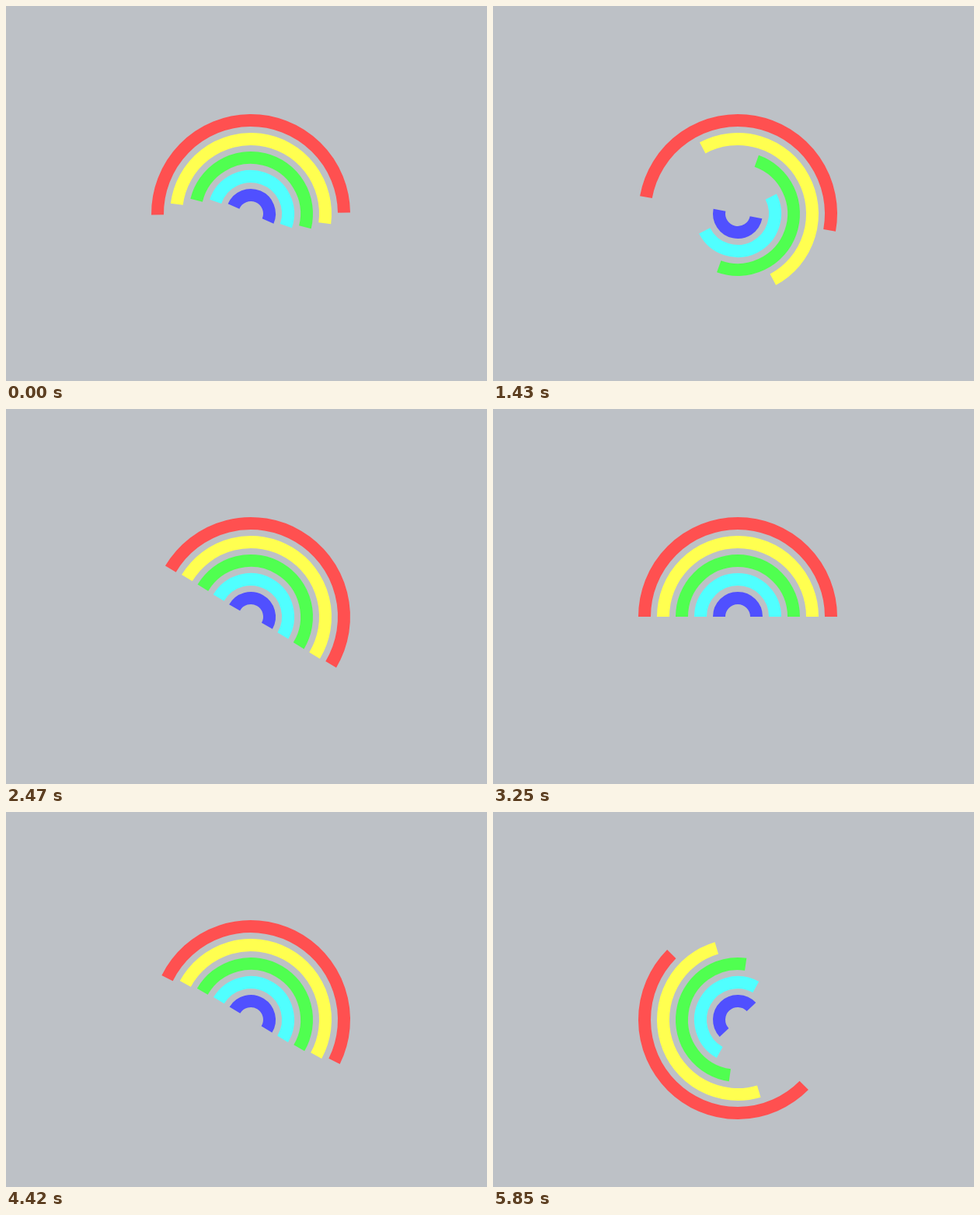
Recreate the animation shown at these times as an HTML page with a canvas. Size 619 by 482 pixels, loop 5980 ms.

```html
<!DOCTYPE html>
<html lang="en">
<head>
<meta charset="utf-8">
<title>Rainbow loader</title>
<style>
  html, body { margin: 0; width: 100%; height: 100%; overflow: hidden; background: #bdc1c6; }
  canvas { display: block; }
</style>
</head>
<body>
<canvas id="stage" width="619" height="482"></canvas>
<script>
const ctx = document.getElementById('stage').getContext('2d');
const COLORS = ['#ff5050', '#ffff50', '#50ff50', '#50ffff', '#5050ff'];
const LOOP = 5980, STEP = 130;
const CYCLE = 2080;          // one spin plus its rest
const SPIN = CYCLE * 0.85;   // moving part of the cycle
const STAGGER = 52;          // inner arcs run ahead of outer ones
const START = 660;           // outer arc's time into its spin at t = 0

const bezier = (a, b, s) => 3 * (1 - s) ** 2 * s * a + 3 * (1 - s) * s * s * b + s ** 3;

// cubic-bezier(.175, .885, .32, 1.275)
function easeOutBack(x) {
  let low = 0, high = 1;
  for (let i = 0; i < 30; i++) {
    const mid = (low + high) / 2;
    if (bezier(0.175, 0.32, mid) < x) low = mid; else high = mid;
  }
  return bezier(0.885, 1.275, low);
}

function draw(time) {
  ctx.clearRect(0, 0, 619, 482);
  ctx.lineWidth = 16;
  COLORS.forEach((color, i) => {
    const local = (START + time + i * STAGGER) % CYCLE;
    const turn = local < SPIN ? easeOutBack(local / SPIN) * 2 * Math.PI : 0;
    ctx.strokeStyle = color;
    ctx.beginPath();
    ctx.arc(315, 267, 120 - 24 * i, turn - Math.PI, turn);
    ctx.stroke();
  });
}

const origin = performance.now();
function tick() {
  const time = (performance.now() - origin) % LOOP;
  draw(Math.floor(time / STEP) * STEP);
  requestAnimationFrame(tick);
}
tick();
</script>
</body>
</html>
```
